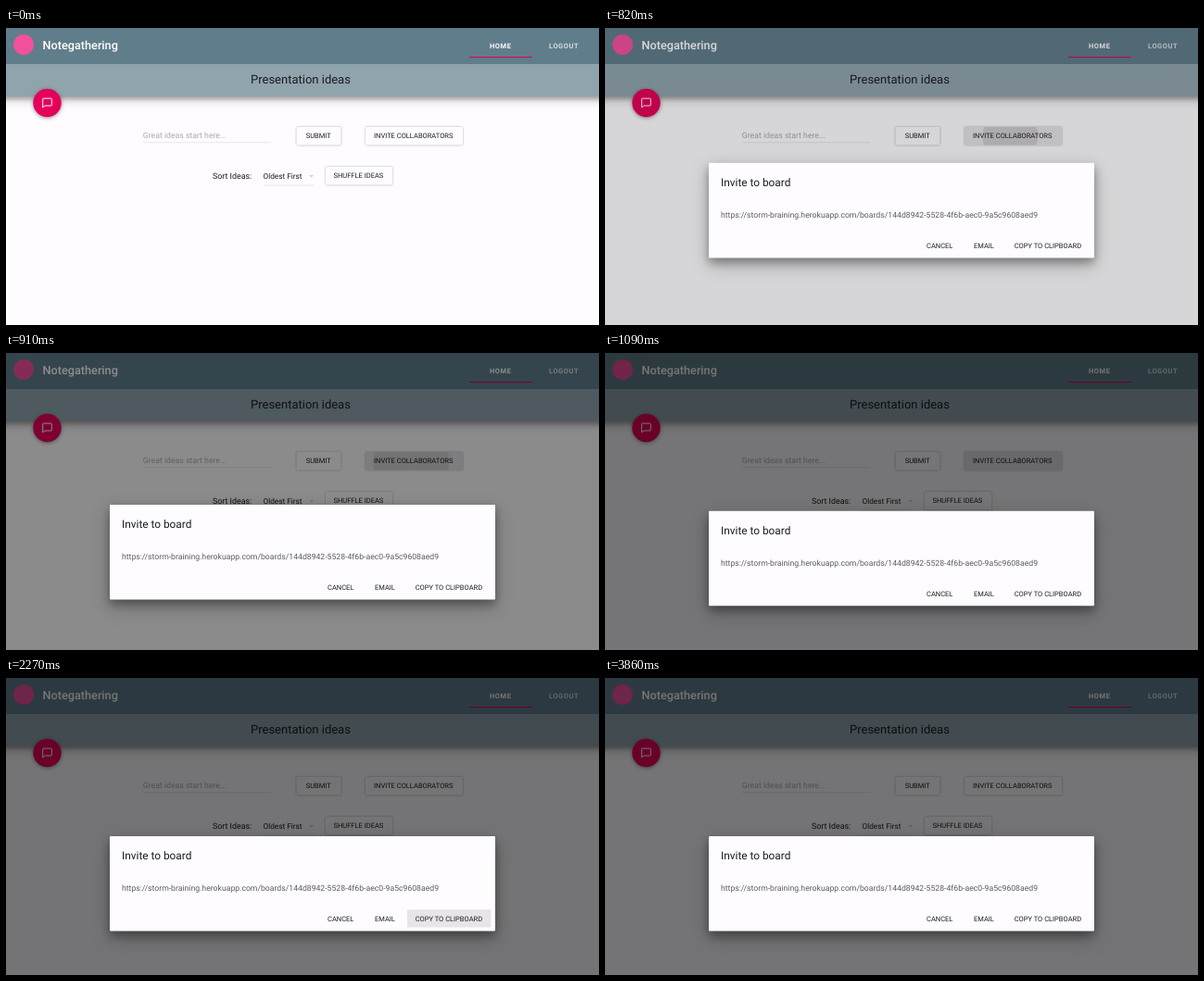
An HTML page for the animation above (3900 ms loop, 640 by 321 pixels).

```html
<!DOCTYPE html>
<html lang="en">
<meta charset="utf-8">
<title>Presentation ideas</title>
<style>
  html, body { margin: 0; height: 100%; overflow: hidden; background: #fefcff }
  svg { display: block; width: 100%; height: 100% }
  text { font: 8.6px Roboto, sans-serif; fill: #1c1c1e; text-rendering: geometricPrecision; white-space: pre }
  .brand { font-size: 12.7px; font-weight: 500; fill: #fff }
  .tab { font-size: 7.5px; font-weight: 700; letter-spacing: .55px; fill: #fff }
  .title { font-size: 13px }
  .heading { font-size: 11.85px }
  .label { font-size: 7.53px }
  .raised { fill: #fefcff; filter: drop-shadow(0 .5px .8px #0003) drop-shadow(0 .5px 1.2px #0002) }
  .bar { filter: drop-shadow(0 3.2px 2.6px #0004) drop-shadow(0 4px 5px #0003) }
  .fab { fill: #e5005a; filter: drop-shadow(0 1.6px 2.2px #0006) }
  .paper { fill: #fefcff; filter: drop-shadow(0 5.3px 4.8px #0004) drop-shadow(0 6px 9px #0004) }
</style>
<svg viewBox="0 0 640 321">
  <clipPath id="inviteShape"><rect x="388" y="107" width="105" height="19.5" rx="1"/></clipPath>

  <rect width="640" height="321" fill="#fefcff"/>
  <g class="bar">
    <rect x="-20" y="-20" width="680" height="93.5" fill="#90a4ae"/>
    <rect width="640" height="39" fill="#607d8b"/>
  </g>
  <circle cx="19" cy="18" r="11" fill="#f2509c"/>
  <text class="brand" x="39.5" y="23">Notegathering</text>
  <text class="tab" x="522" y="21.7">HOME</text>
  <text class="tab" x="586" y="21.7" opacity=".75">LOGOUT</text>
  <rect x="500" y="31" width="68" height="1.1" fill="#d8085c"/>
  <text class="title" x="264" y="60.2">Presentation ideas</text>

  <circle class="fab" cx="44.5" cy="81" r="15.2"/>
  <path d="M39.7 86V76.7q0-.6.6-.6h8.4q.6 0 .6.6v6.7q0 .6-.6.6h-7z" fill="none" stroke="#fff"/>

  <text x="147.8" y="119" style="font-size:8.7px;fill:#aaa9ac">Great ideas start here...</text>
  <path d="M148 123.7h138M277.5 170h55" stroke="#d8d7db" stroke-width=".6"/>
  <rect class="raised" x="313.5" y="107" width="48" height="19.5" rx="1"/>
  <text class="label" x="323.7" y="119.3">SUBMIT</text>

  <rect class="raised" x="388" y="107" width="105" height="19.5" rx="1"/>
  <g clip-path="url(#inviteShape)">
    <rect id="inviteHover" x="388" y="107" width="105" height="19.5"/>
    <circle id="ripple" cx="437.3" cy="117"/>
  </g>
  <text class="label" x="397" y="119.3">INVITE COLLABORATORS</text>

  <text x="223" y="162.7" style="font-size:8.85px">Sort Ideas:</text>
  <text x="277.5" y="162.7" style="font-size:8.25px">Oldest First</text>
  <path d="M327.2 159h5l-2.5 2.5z" fill="#d0cfd3"/>
  <rect class="raised" x="345" y="150" width="72" height="19.5" rx="1"/>
  <text class="label" x="353.5" y="162.3">SHUFFLE IDEAS</text>

  <rect id="backdrop" width="640" height="321"/>
  <g id="dialog">
    <rect class="paper" x="112" y="170.9" width="416" height="102.7" rx="1"/>
    <text class="heading" x="125" y="196.3">Invite to board</text>
    <text x="125" y="230.2" style="font-size:8.66px;fill:#5c5b5e">https://storm-braining.herokuapp.com/boards/144d8942-5528-4f6b-aec0-9a5c9608aed9</text>
    <rect id="copyHover" x="433" y="250.3" width="90.5" height="19.2" rx="1"/>
    <text class="label" x="347" y="262.9">CANCEL</text>
    <text class="label" x="398" y="262.9">EMAIL</text>
    <text class="label" x="441.7" y="262.9">COPY TO CLIPBOARD</text>
  </g>
</svg>
<script>
  const LOOP = 3900, OPEN = 793, FADE = 400, SLIDE = 450, DROP = 34;
  const part = id => document.getElementById(id);
  const [inviteHover, ripple, backdrop, dialog, copyHover] =
    ['inviteHover', 'ripple', 'backdrop', 'dialog', 'copyHover'].map(part);

  const ramp = (t, from, to) => Math.min(1, Math.max(0, (t - from) / (to - from)));

  // cubic-bezier(.23, 1, .32, 1), solved by bisection
  function easeOut(x) {
    let low = 0, high = 1;
    for (let i = 0; i < 20; i++) {
      const s = (low + high) / 2;
      const curve = .69 * s * (1 - s) ** 2 + .96 * s * s * (1 - s) + s ** 3;
      if (curve < x) low = s; else high = s;
    }
    return 1 - (1 - high) ** 3;
  }

  function draw(t) {
    inviteHover.setAttribute('opacity', .1 * (ramp(t, 640, 740) - ramp(t, 1130, 1180)));
    ripple.setAttribute('r', 42 * Math.sqrt(ramp(t, 720, 920)));
    ripple.setAttribute('opacity', .1 * ramp(t, 715, 740) * (1 - ramp(t, 870, 1060)));

    const slid = easeOut(ramp(t, OPEN, OPEN + SLIDE));
    backdrop.setAttribute('opacity', t < OPEN ? 0 : .54 * easeOut(ramp(t, OPEN, OPEN + FADE)));
    dialog.setAttribute('visibility', t < OPEN ? 'hidden' : 'visible');
    dialog.setAttribute('transform', `translate(0 ${DROP * (slid - 1)})`);

    const hover = t < 2090 ? 0 : t < 2270 ? .05 : .09;
    copyHover.setAttribute('opacity', hover * (1 - ramp(t, 2320, 2590)));
  }

  const start = performance.now();
  (function tick() {
    draw((performance.now() - start) % LOOP);
    requestAnimationFrame(tick);
  })();
</script>
</html>
```
